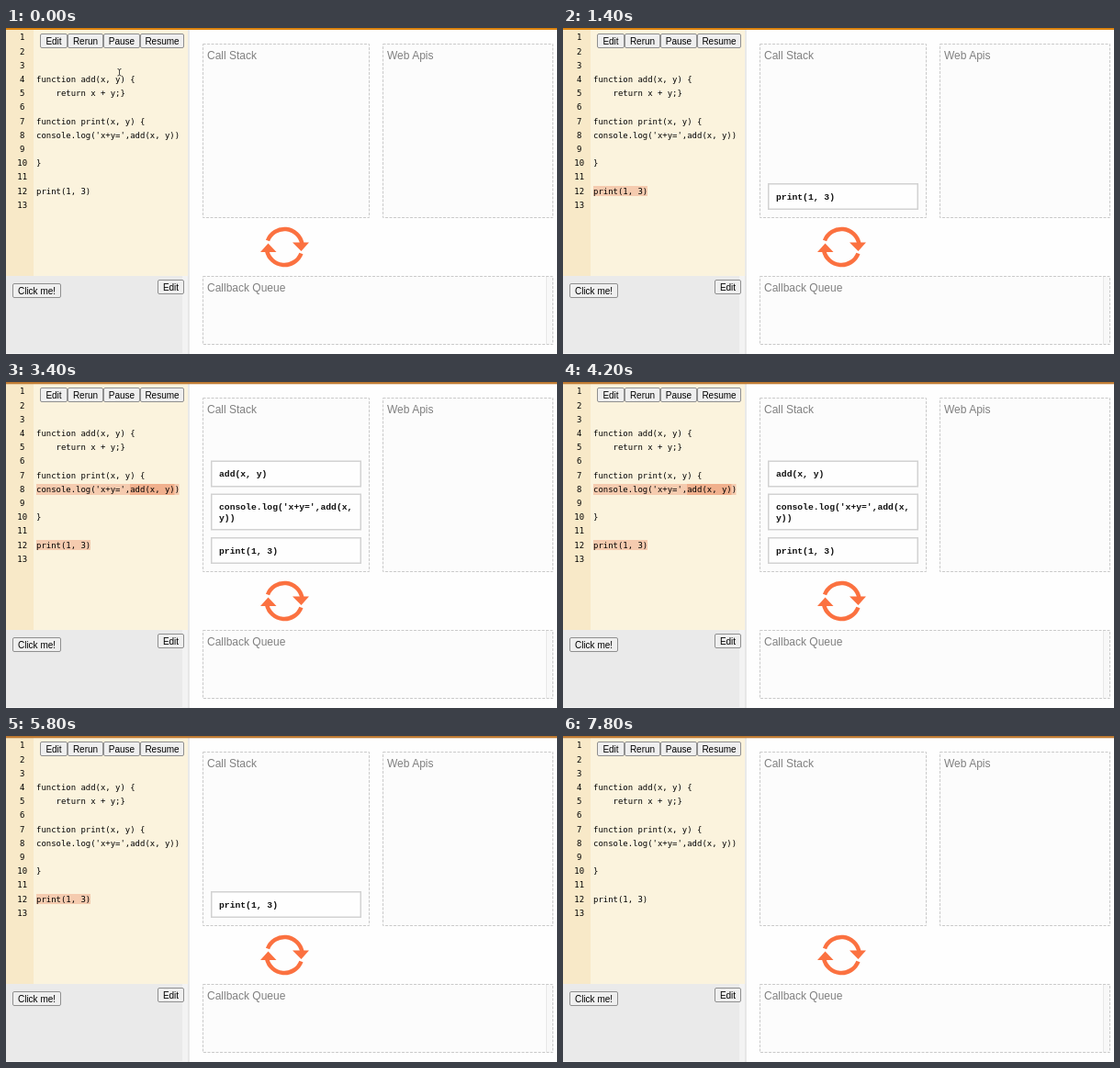
An HTML page for the animation above (8000 ms loop, 600 by 355 pixels).

```html
<!DOCTYPE html>
<html lang="en">
<head>
<meta charset="utf-8">
<title>Call stack</title>
<style>
  html, body { margin: 0; width: 100%; height: 100%; overflow: hidden; background: #fefefe; }
  svg { display: block; width: 600px; height: 355px; }
  text { white-space: pre; }
  .code { font: 8.95px "DejaVu Sans Mono", monospace; fill: #000; }
  .num { text-anchor: middle; }
  .title { font: 12px "Liberation Sans", sans-serif; fill: #808080; }
  .button rect { fill: #efefef; stroke: #8f8f8f; }
  .button text { font: 10px "Liberation Sans", sans-serif; text-anchor: middle; }
  .panel { fill: #fcfcfc; stroke: #cacaca; stroke-dasharray: 3 1.5; }
  .call rect { fill: #fefefe; stroke: #d2d2d2; stroke-width: 1.5; }
  .call text { font: bold 9.7px "Liberation Mono", monospace; fill: #111; }
  .mark { fill: #f5cbaf; }

  /* One loop is 8000 ms, so 1% is 80 ms. */
  .bar, .shade, .mark, .call, .cursor { animation: 8s linear infinite; }
  .bar, .shade, .mark { animation-timing-function: step-end; }
  .bar { animation-name: bar; }
  .shade { animation-name: shade; }
  .mark.print { animation-name: mark-print; }
  .mark.log { animation-name: mark-log; }
  .mark.add { animation-name: mark-add; fill: #f0b08d; }
  .call.print { animation-name: call-print; }
  .call.log { animation-name: call-log; }
  .call.add { animation-name: call-add; }
  .cursor { animation-name: cursor; }

  @keyframes bar { 0% { fill: #dc8410; } 21.25%, 100% { fill: #c07c34; } }
  @keyframes shade { 0% { opacity: 0; } 21.25%, 100% { opacity: .3; } }
  @keyframes mark-print { 0%, 75%, 100% { opacity: 0; } 12.5% { opacity: 1; } }
  @keyframes mark-log { 0%, 70%, 100% { opacity: 0; } 25% { opacity: 1; } }
  @keyframes mark-add { 0%, 58.75%, 100% { opacity: 0; } 41.25% { opacity: 1; } }
  @keyframes call-print {
    0%, 11.9%, 84.4%, 100% { opacity: 0; }
    15%, 78.1% { opacity: 1; }
  }
  @keyframes call-log {
    0%, 23.75%, 72.5%, 100% { opacity: 0; }
    25.7%, 69.4% { opacity: 1; }
  }
  @keyframes call-add {
    0%, 40%, 64.4%, 100% { opacity: 0; }
    42%, 58.1% { opacity: 1; }
  }
  @keyframes cursor {
    0%, 1% { transform: none; animation-timing-function: ease-in-out; }
    9% { transform: translate(-35px, -32px); }
    12.4% { transform: translate(-35px, -32px); opacity: 1; }
    12.5%, 100% { transform: translate(-35px, -32px); opacity: 0; }
  }
</style>
</head>
<body>
<svg viewBox="0 0 600 355">
  <rect width="600" height="355" fill="#fefefe"/>
  <rect width="198" height="270" fill="#fbf3dd"/>
  <rect width="30" height="270" fill="#f8e9c8"/>
  <rect y="270" width="198.5" height="85" fill="#f3f3f3"/>
  <rect y="270" width="192" height="84" fill="#eaeaea"/>
  <rect x="198.5" width="1" height="355" fill="#d4d4d4"/>
  <rect class="bar" width="600" height="2"/>
  <rect class="shade" y="2" width="600" height="1" fill="#c07c34"/>

  <rect class="panel" x="214.5" y="17.5" width="181" height="189"/>
  <rect class="panel" x="410.5" y="17.5" width="185" height="189"/>
  <rect class="panel" x="214.5" y="270.5" width="381" height="74"/>
  <rect x="588" y="271" width="7" height="73" fill="#f8f8f8"/>
  <path d="M588.5 271V344" stroke="#e8e8e8"/>
  <text class="title" x="219" y="33.7">Call Stack</text>
  <text class="title" x="415" y="33.7">Web Apis</text>
  <text class="title" x="219" y="286.8">Callback Queue</text>

  <g fill="none" stroke="#fb7140" stroke-width="4.5">
    <path d="M285 231.5A19.5 19.5 0 0 1 322.4 235"/>
    <path d="M321.4 245.5A19.5 19.5 0 0 1 284.1 242.5"/>
  </g>
  <path fill="#fb7140" d="M312 233.5H330L321.5 243ZM277 244H294.5L285.5 234.5Z"/>

  <rect class="mark print" x="33" y="172" width="59" height="11"/>
  <rect class="mark log" x="33" y="111" width="155.5" height="12"/>
  <rect class="mark add" x="135" y="111" width="48.5" height="12"/>
  <g id="editor"></g>
  <g id="buttons"></g>

  <g class="call print">
    <rect x="223.75" y="169.75" width="162.5" height="27.5"/>
    <text x="232" y="186.7">print(1, 3)</text>
  </g>
  <g class="call log">
    <rect x="223.75" y="122.25" width="162.5" height="38.5"/>
    <text x="232" y="139">console.log('x+y=',add(x,</text>
    <text x="232" y="150.6">y))</text>
  </g>
  <g class="call add">
    <rect x="223.75" y="86.25" width="162.5" height="27.5"/>
    <text x="232" y="103">add(x, y)</text>
  </g>

  <path class="cursor" d="M121.5 44.5Q123.5 44.5 123.5 46V50.5Q123.5 52 121.5 52M125.5 44.5Q123.5 44.5 123.5 46M123.5 50.5Q123.5 52 125.5 52"
    fill="none" stroke="#333" stroke-width=".9"/>
</svg>
<script>
  const source = [
    '', '', '',
    'function add(x, y) {',
    '    return x + y;}',
    '',
    'function print(x, y) {',
    "console.log('x+y=',add(x, y))",
    '',
    '}',
    '',
    'print(1, 3)',
    ''
  ];

  function add(parent, tag, attrs, text = '') {
    const el = document.createElementNS('http://www.w3.org/2000/svg', tag);
    for (const key in attrs) el.setAttribute(key, attrs[key]);
    el.textContent = text;
    return parent.appendChild(el);
  }

  const editor = document.getElementById('editor');
  source.forEach((line, i) => {
    const y = 13.4 + 15.2 * i;
    add(editor, 'text', { class: 'code num', x: 17.7, y }, i + 1);
    add(editor, 'text', { class: 'code', x: 33, y }, line);
  });

  const buttons = document.getElementById('buttons');
  function button(label, x, y, width) {
    const g = add(buttons, 'g', { class: 'button' });
    add(g, 'rect', { x: x + .5, y: y + .5, width: width - 1, height: 15, rx: 1.5 });
    add(g, 'text', { x: x + width / 2, y: y + 11.6 }, label);
  }
  button('Edit', 37, 6, 30);
  button('Rerun', 67, 6, 39);
  button('Pause', 106, 6, 40);
  button('Resume', 146, 6, 48);
  button('Click me!', 7, 278, 53);
  button('Edit', 165, 274, 29);
</script>
</body>
</html>
```
